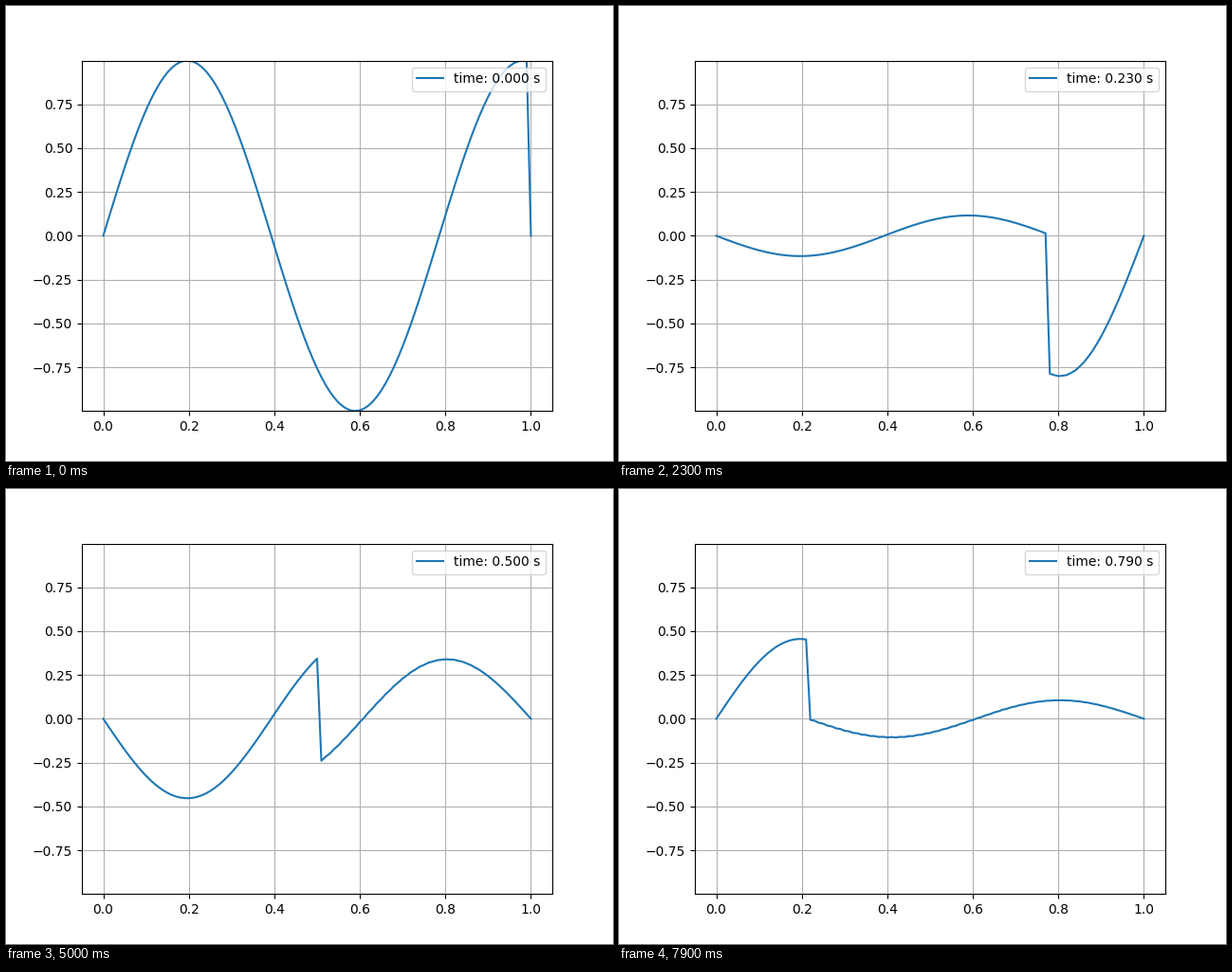
Recreate the animation shown at these times as a matplotlib script. Size 640 by 480 pixels, loop 8000 ms.

```python
import numpy as np
import matplotlib.pyplot as plt
from matplotlib.animation import FuncAnimation

# Distortionless telegraph equation: u_tt + 2a u_t + a^2 u = u_xx, fixed ends
A = 1.0
K = 8.0
CELLS = 100
H = 1 / CELLS  # same step in space and time
FRAMES = 80


def pin(u):
    u[0] = u[-1] = 0
    return u


def solve(u0):
    u1 = pin(u0 * (1 - (K**2 + A**2) * H**2 / 2))
    states = [pin(u0.copy()), u1]
    while len(states) < FRAMES:
        prev, cur = states[-2:]
        new = np.zeros_like(cur)
        new[1:-1] = (cur[2:] + cur[:-2] - (A * H) ** 2 * cur[1:-1]
                     - (1 - A * H) * prev[1:-1]) / (1 + A * H)
        states.append(new)
    return states


def label(i):
    return f"time: {i * H:.3f} s"


x = np.linspace(0, 1, CELLS + 1)
waves = solve(np.sin(K * x))

fig, ax = plt.subplots(figsize=(6.4, 4.8), dpi=100)
line, = ax.plot(x, waves[0], label=label(0))
ax.set_ylim(waves[0].min(), waves[0].max())
ax.grid()
caption = ax.legend(loc="upper right").get_texts()[0]


def update(i):
    line.set_ydata(waves[i])
    caption.set_text(label(i))
    return line, caption


anim = FuncAnimation(fig, update, frames=FRAMES, interval=100,
                     repeat=True, repeat_delay=0)
plt.show()
```
